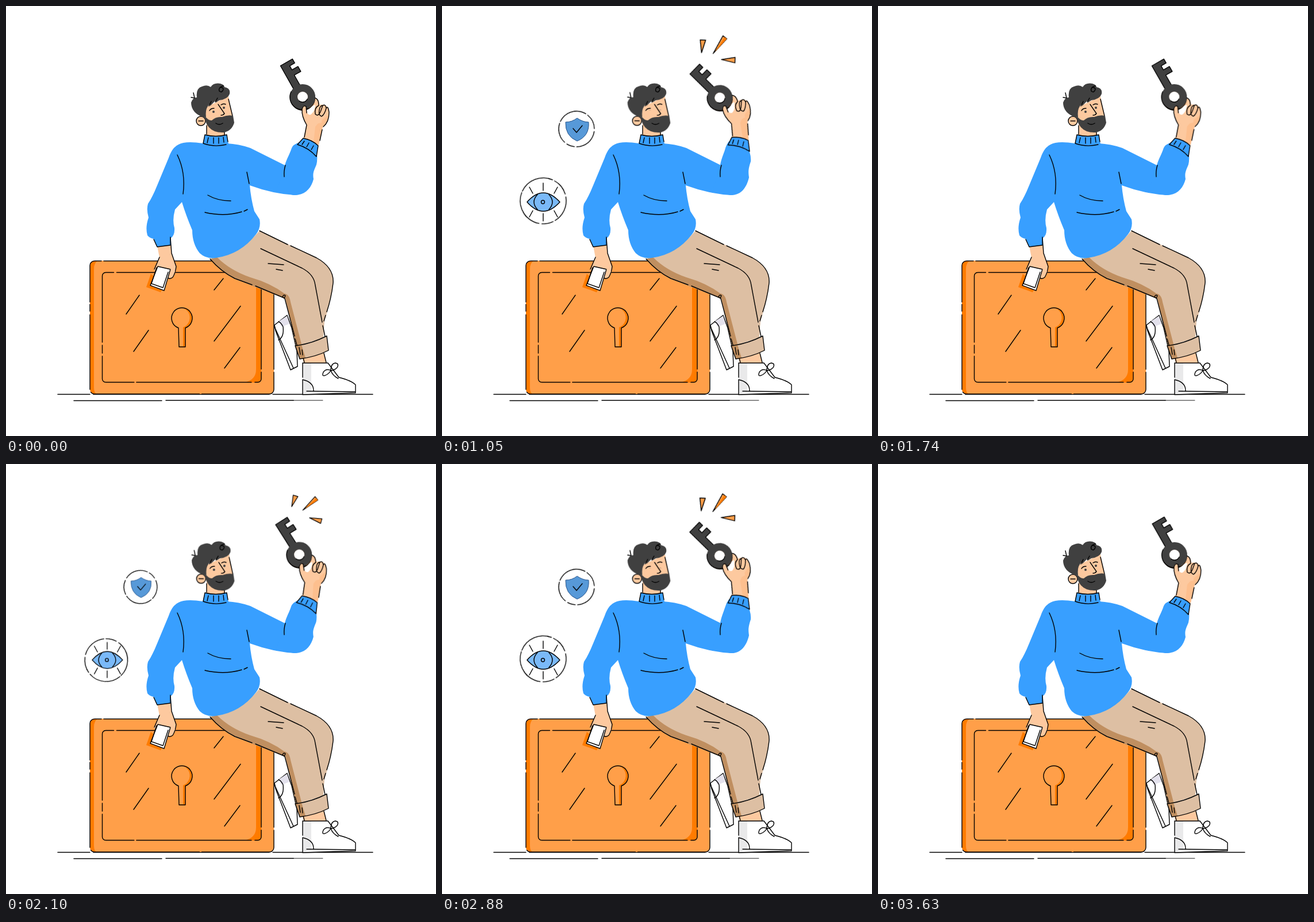
Recreate the animation shown at these times as an HTML page without scripts. Size 748 by 748 pixels, loop 3.69 s.

```html
<!DOCTYPE html>
<html lang="en">
<head>
<meta charset="utf-8">
<title>Man with key on a safe</title>
<style>
  html, body { margin: 0; width: 100%; height: 100%; overflow: hidden; background: #fff; }
  svg { display: block; width: 100vw; height: 100vh; }

  .line { fill: none; stroke: #000; stroke-width: 1.4; stroke-linecap: round; stroke-linejoin: round; }
  .edge { stroke: #000; stroke-width: 1.4; stroke-linejoin: round; stroke-linecap: round; }
  .blue { fill: #389fff; }
  .skin { fill: #fdc99f; }
  .skin-shade { fill: #fdbf8e; }
  .dark { fill: #404040; }
  .orange { fill: #ff9f49; }
  .deep { fill: #ff7b00; }
  .pants { fill: #ddbfa3; }
  .pants-shade { fill: #c08f60; }
  .white { fill: #fff; }
  .grey { fill: #e9e9ea; }

  /* One cycle; every moving part shares it. */
  .arm, .sleeve, .head, .eyes, .ray, .icon, .ring, .shield {
    animation: 1845ms ease-in-out infinite;
  }
  .arm, .sleeve { animation-timing-function: cubic-bezier(.42, 0, .52, 1); }
  .arm { transform-origin: 505px 275px; animation-name: swing; }
  .sleeve { animation-name: bend; }
  .head { transform-origin: 365px 225px; animation-name: tilt; }
  .eyes { transform-origin: 371px 181px; animation-name: blink; }
  .ray { animation-name: flash; }
  .icon { animation-name: pop; }
  .ring { animation-name: spin; animation-timing-function: linear; }
  .shield { transform-origin: 235px 214px; animation-name: pulse; }

  @keyframes swing { 50% { transform: rotate(-16.7deg); } }
  @keyframes bend {
    0%, 100% { d: path("M484 285 C485 270 492 262 497 247 Q499 241 511 237 L541 258 Q542 268 540 276 C536 286 533 290 535 301 C531 317 520 330 500 329 L470 322 Z"); }
    50% { d: path("M483 285 C484 270 488 262 492 250 Q494 242 499 235 L532 246 Q538 260 537 270 C532 285 533 290 534 298 C530 316 520 330 502 329 L470 322 Z"); }
  }
  @keyframes tilt {
    0%, 70%, 100% { transform: rotate(0deg); }
    32% { transform: rotate(2.8deg); }
  }
  @keyframes blink {
    0%, 52%, 62%, 100% { transform: scaleY(1); }
    55%, 59% { transform: scaleY(.12); }
  }
  @keyframes flash {
    0%, 3%, 95%, 100% { transform: scale(0); }
    17%, 79% { transform: scale(1); }
  }
  @keyframes pop {
    0%, 93%, 100% { transform: scale(0); }
    17%, 79% { transform: scale(1); }
  }
  @keyframes spin { to { transform: rotate(360deg); } }
  @keyframes pulse {
    0%, 57%, 100% { transform: scale(1); }
    29% { transform: scale(.87); }
  }
</style>
</head>
<body>
<svg viewBox="0 0 748 748" xmlns="http://www.w3.org/2000/svg">
  <!-- Ground -->
  <path class="line" d="M90 675.500H146M152 675.500H458M464 675.500H638M118 686.500H271M278 686H500"/>
  <path class="line" d="M500 686H551" style="stroke-width:.9"/>

  <!-- Safe -->
  <rect class="orange" x="146" y="443" width="320" height="232" rx="8"/>
  <path class="deep" d="M160 443Q153 446 153 458V664Q153 672 157 675Q146 675 146 664V452Q146 443 160 443Z"/>
  <path class="deep" d="M435 487L444 489V646Q444 655 435 655H414Q435 651 435 632Z"/>
  <rect class="line" x="146" y="443.500" width="320" height="231.500" rx="8"
        stroke-dasharray="12 4 250 5 90 6 130 5 160 4 190 5 130 6"/>
  <rect class="line" x="167.500" y="463.500" width="276.500" height="191" rx="6"
        stroke-dasharray="14 5 205 5 62 5 140 5 26 6 200 4 98 5"/>
  <path class="line" d="M232 503L209 536M248 564L222 601M378 474L362 494M408 522L362 583M407 594L380 630"/>
  <path class="deep" d="M300 560A18 18 0 1 1 312 560V593H301Z"/>
  <path class="orange" d="M300 560A18 18 0 1 1 319 547Q316 556 308 559V592H301Z"/>
  <path class="line" d="M300 560A18 18 0 1 1 312 560V593H301Z"/>

  <!-- Hand with card -->
  <path class="deep" d="M252 466L244 489L269 498L275 486Z"/>
  <path class="skin" d="M263 417L287 413L288 432L296 452Q296 465 290 472L281 474L257 459L267 438Z"/>
  <path class="line" d="M286 403L288 430L296 453Q295 464 290 472Q285 476 282 473M267 437L258 458"/>
  <path class="white edge" d="M264 453L286 458L275 495L251 486Z"/>
  <path class="line" d="M262 455L253 483L273 490L282 463"/>
  <path class="skin" d="M280 442Q285 450 287 460L294 463L292 446Z"/>

  <!-- Back shoe -->
  <path class="white edge" d="M489 538L467 555L469 565L495 633L507 627L506 600L497 560Z"/>
  <path d="M489 539L474 549L479 558L493 553Z" fill="#e3e1ec"/>
  <path class="line" d="M467 558L500 630M474 581Q484 576 482 558Q478 550 474 549"/>

  <!-- Trousers -->
  <path class="skin" d="M514 608L553 602L557 621H518Z"/>
  <path class="line" d="M517 612L519 620M553 604L557 620"/>
  <path class="pants" d="M441 391L540 438Q571 455 569 482Q566 510 554 548L552 577L506 592L486 508Q440 490 398 475Q375 463 355 440Q410 428 441 391Z"/>
  <path class="pants-shade" d="M355 440L367 437Q390 460 425 472Q460 482 484 500Q493 501 495 515L514 588L505 592L486 509Q430 488 398 474Q372 462 355 440Z"/>
  <path class="line" d="M441 391L490 415M495 417L540 438Q571 455 569 482Q566 508 558 532M556 538L553 548"/>
  <path class="line" d="M355 440Q374 462 398 474L428 485M434 487L484 508Q488 502 483 503Q479 506 485 509L502 574M503 579L506 590"/>
  <path class="line" d="M443 422L515 456Q536 467 538 486L550 550M551 556L555 575M456 448L483 450M470 458L481 460"/>
  <path class="pants" d="M503 591Q530 588 558 574L561 599Q540 610 511 614Z"/>
  <path class="pants-shade" d="M503 591L514 589L521 612L511 614Z"/>
  <path class="line" d="M503 591Q530 588 558 574L561 599Q540 610 511 614ZM510 594L512 606M515 598L516 607"/>

  <!-- Front shoe -->
  <path class="white" d="M516 621H560L579 646Q605 653 609 661V672L516 676Z"/>
  <path class="grey" d="M516 621H531V672L516 675Z"/>
  <path class="line" d="M516 621H560L579 646Q602 652 608 659V673L516 676V650M516 646V621M523 670L608 671M516 650Q535 654 535 669"/>
  <path class="line" d="M565 634Q557 630 552 637Q549 644 554 643Q561 641 565 634Q565 622 573 621Q580 622 576 629Q571 634 565 634Q568 643 578 648"/>

  <!-- Sweater -->
  <path class="blue" d="M343 239Q312 234 300 241Q289 246 283 264L263 312Q255 332 247 344Q244 354 248 368Q242 385 246 399Q250 404 257 405L263 419L287 416L286 404Q294 400 293 386Q289 372 294 354L306 341Q313 364 324 390Q324 414 337 430Q349 441 366 438Q408 432 435 397Q444 385 441 371L432 357Q426 335 424 312Q465 327 503 329Q520 328 520 300L485 277L425 247Q405 240 384 239Z"/>
  <path class="line" d="M257 406L263 419L286 416M286 402V416M298 259Q313 290 308 327M351 329Q368 339 391 339M346 359Q380 367 410 358M414 357L420 354M419 289L423 309"/>
  <path class="blue sleeve" d="M484 285 C485 270 492 262 497 247 Q499 241 511 237 L541 258 Q542 268 540 276 C536 286 533 290 535 301 C531 317 520 330 500 329 L470 322 Z"/>
  <path class="line" d="M484 297Q483 287 486 277"/>

  <!-- Raised forearm, key and flashes -->
  <g class="arm">
    <path class="skin" d="M517 232L523 207Q514 193 515 180L537 160Q545 161 544 172Q562 169 562 186Q561 203 551 210L544 242Z"/>
    <path class="skin-shade" d="M538 210Q545 200 561 190Q560 204 551 210L544 241L535 237Z"/>
    <path class="white" d="M521 178L538 172Q537 187 526 191Z"/>
    <g transform="translate(516 158)">
      <circle cy="2" r="21.500" fill="#704524" stroke="#000"/>
      <path class="dark edge" transform="rotate(-29.500)" d="M-7 -15V-66H17V-58H7V-50H19V-40H6V-15Z"/>
      <circle r="15.500" fill="none" stroke="#404040" stroke-width="13"/>
      <circle class="white" r="9"/>
      <path class="line" d="M-20 -9A22 22 0 0 0 10 20M-6 7A9 9 0 0 0 8 4"/>
    </g>
    <path class="skin" d="M524 208Q514 192 515 178Q518 171 522 175L524 187Q531 193 537 184Q535 176 541 172L539 164Q541 160 544 166L546 174Q552 184 549 203Z"/>
    <path class="line" d="M519 228L523 207Q514 192 515 179Q518 171 522 175L523 186M538 160Q544 162 544 173Q536 177 538 188Q543 193 547 184L551 173Q546 173 545 181Q543 190 549 192Q554 189 557 178Q560 172 562 185Q562 202 552 210M550 215L546 234M551 173Q556 170 557 178"/>
    <path class="blue" d="M517 230Q533 233 543 243L540 262Q527 247 507 241Z"/>
    <path class="line" d="M517 230Q533 233 543 243L540 262M507 241Q527 247 540 262M507 241L517 230M519 235L515 241M527 238L523 245M535 243L531 250"/>

    <path class="ray orange edge" style="transform-origin:507px 74px" d="M511 52L520 55L507 74Z"/>
    <g class="ray" style="transform-origin:526px 81px">
      <path class="orange edge" d="M551 56L556 63L526 81Z"/>
      <path class="deep" d="M553 59L556 63L530 79Z"/>
    </g>
    <path class="ray orange edge" style="transform-origin:537px 95px" d="M537 95L561 98L558 107Z"/>
  </g>

  <!-- Head -->
  <path class="skin" d="M349 200L380 210L381 230H349Z"/>
  <path class="line" d="M349 208V223M380 219V224"/>
  <g class="head">
    <path class="skin" d="M344 178L387 157L394 194L385 214L352 210Z"/>
    <circle class="skin edge" cx="339" cy="200" r="8"/>
    <path class="line" d="M335 200H343"/>
    <path class="line" d="M387 162L394 191"/>
    <path class="dark" d="M345 190Q352 200 358 199Q365 192 376 193Q386 189 395 191L397 203Q393 217 379 220Q362 221 353 211Q346 203 345 190Z"/>
    <path class="dark" d="M344 194Q322 186 322 168Q325 159 332 159Q330 143 341 140Q350 136 356 141Q361 133 373 135Q380 137 380 141Q391 143 389 153Q386 162 371 164L365 168L364 165L355 174L354 171Q346 178 348 193Z"/>
    <path class="line" d="M378 139Q369 141 371 148Q376 152 378 145Q378 141 372 142M322 159L328 160L326 151M353 174L357 166M364 167L368 160"/>
    <path class="line" d="M369 171Q375 180 380 187Q378 190 374 190M365 204Q371 208 377 204M354 182Q356 178 362 178M374 172Q378 169 382 171"/>
    <g class="eyes dark">
      <circle cx="361" cy="184" r="2"/>
      <circle cx="379" cy="177" r="2"/>
    </g>
  </g>

  <!-- Collar -->
  <path class="blue" d="M346 224Q365 229 384 224L387 240Q365 247 342 241Z"/>
  <path class="line" d="M346 224Q365 229 384 224L386 236M346 224L343 239Q362 246 383 241M352 229L350 238M361 229V239M370 229V239M378 228L379 237"/>

  <!-- Shield badge -->
  <g class="icon" style="transform-origin:234px 214px">
    <circle class="line ring" style="transform-origin:234px 214px" cx="234" cy="214" r="31"
            stroke-dasharray="52 4 27 5 44 4 14 5 36 4"/>
    <g class="shield">
      <path d="M235 195Q245 202 255 202Q257 226 235 235Q214 226 215 202Q226 202 235 195Z" fill="#5799d8" stroke="#25528a"/>
      <path class="line" d="M228 213L234 220L244 208"/>
    </g>
  </g>

  <!-- Eye badge -->
  <g class="icon" style="transform-origin:175px 340px">
    <circle class="line ring" style="transform-origin:175.400px 340.300px" cx="175.400" cy="341.800" r="40"
            stroke-dasharray="62 4 30 5 48 4 20 5 70 4"/>
    <path class="edge" d="M148 341Q176 309 205 341Q176 373 148 341Z" fill="#7ab9f8"/>
    <path class="line" d="M166 328Q154 341 166 354M186 328Q198 341 186 354"/>
    <circle class="line" cx="175.500" cy="341" r="3"/>
    <path class="line" d="M176 308V321M152 315L158 326M201 315L195 326M152 367L158 356M176 361V374M201 367L195 356"/>
  </g>
</svg>
</body>
</html>
```
